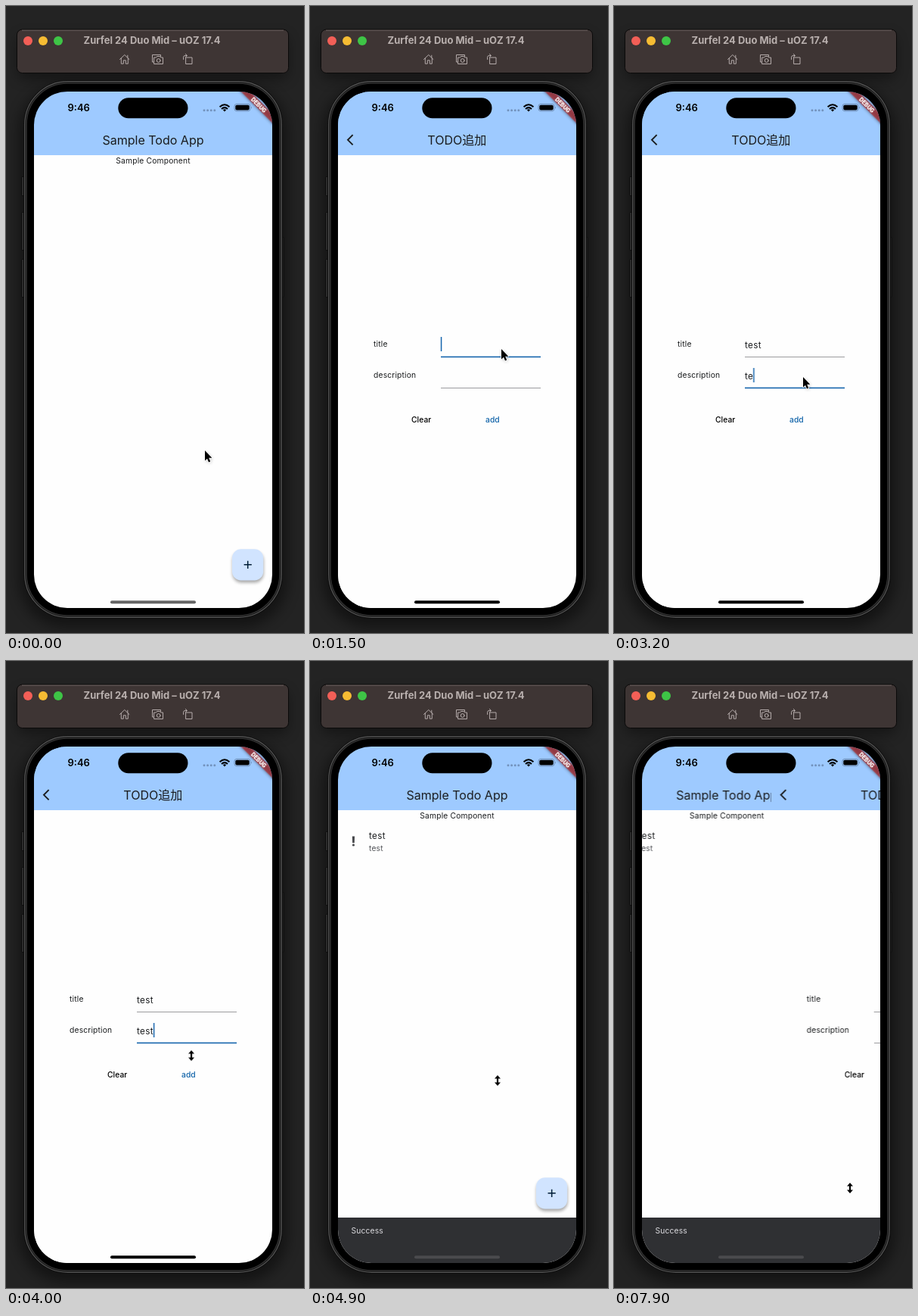
An HTML page for the animation above (8 s loop, 394 by 828 pixels).

```html
<!DOCTYPE html>
<html lang="ja">
<head>
<meta charset="utf-8">
<title>Sample Todo App</title>
<style>
  html, body { margin: 0; width: 100%; height: 100%; overflow: hidden; background: #232323; }
  svg { display: block; width: 394px; height: 828px; }
  text { font-family: Inter, "Noto Sans CJK JP", sans-serif; fill: #1a1c1e; }
  .mid { text-anchor: middle; }
  .head { font-size: 16.1px; letter-spacing: -.05px; }
  .body { font-size: 10.27px; letter-spacing: .18px; }
  .large { font-size: 11.72px; letter-spacing: .37px; }
  .button { font-size: 10.27px; font-weight: 500; letter-spacing: .07px; }
  .tool { fill: none; stroke: #b4abaa; stroke-width: 1; stroke-linejoin: round; stroke-linecap: round; }
  .rule { fill: #9b9b9e; }
  .focus { fill: #1565ad; }
</style>
</head>
<body>
<svg viewBox="0 0 394 828">
  <defs>
    <clipPath id="screen"><rect x="37" y="113" width="315" height="682" rx="44"/></clipPath>
    <filter id="blur" x="-30%" y="-30%" width="160%" height="160%"><feGaussianBlur stdDeviation="9"/></filter>
    <filter id="soft" x="-50%" y="-50%" width="200%" height="200%"><feGaussianBlur stdDeviation="2.2"/></filter>
  </defs>

  <rect width="394" height="828" fill="#232323"/>
  <rect x="17" y="104" width="355" height="716" rx="62" fill="#000" opacity=".45" filter="url(#blur)"/>
  <rect x="16" y="40" width="356" height="56" rx="8" fill="#000" opacity=".4" filter="url(#blur)"/>

  <!-- window bar -->
  <rect x="14.5" y="31" width="359" height="57.5" rx="7" fill="#3e3534" stroke="#0b0a0a"/>
  <path d="M21 32.2H367" stroke="#6a605f"/>
  <circle cx="29" cy="46" r="6" fill="#f35f57"/>
  <circle cx="49" cy="46" r="6" fill="#f6bc33"/>
  <circle cx="69" cy="46" r="6" fill="#3ec546"/>
  <text class="mid" x="193" y="50" style="font-size:13px;font-weight:700;fill:#b9b0ae">Zurfel 24 Duo Mid – uOZ 17.4</text>
  <g class="tool">
    <path d="M150.5 70.5L156.8 64.5L163 70.5M152.3 69V76.2H155.3V71.8H158.3V76.2H161.3V69M160.8 68V65.2"/>
    <path d="M195.5 74H193.5V64.5H204.5V66.5M196 68H198.5L199.5 66.5H203.5L204.5 68H207.5V76.5H196Z"/>
    <circle cx="201.7" cy="72" r="2.4"/>
    <path d="M238 68H246V76.5H238ZM234.6 70.5V67.5Q234.6 65.5 237 65.5H239M237.4 63.4L239.4 65.5L237.4 67.5"/>
  </g>

  <!-- phone body -->
  <g fill="#2b2b2b" stroke="#0d0d0d">
    <rect x="20.5" y="225.5" width="5" height="25" rx="1"/>
    <rect x="20.5" y="272.5" width="5" height="50" rx="1"/>
    <rect x="20.5" y="334.5" width="5" height="50" rx="1"/>
    <rect x="362.5" y="305.5" width="4.5" height="79" rx="1"/>
  </g>
  <rect x="23.5" y="98.5" width="342" height="710" rx="58" fill="#171717" stroke="#0c0c0c"/>
  <rect x="24.7" y="99.7" width="339.6" height="707.6" rx="57" fill="none" stroke="#565656" stroke-width="1.2"/>
  <rect x="27" y="102" width="335" height="703" rx="54.5" fill="#000" stroke="#2e2e2e" stroke-width="1.6"/>

  <g clip-path="url(#screen)">
    <g id="home">
      <rect x="37" y="113" width="315" height="682" fill="#fefefe"/>
      <rect x="37" y="113" width="315" height="84" fill="#9ecaff"/>
      <text class="head mid" x="194.5" y="182.8">Sample Todo App</text>
      <text class="body mid" x="194.5" y="208.3">Sample Component</text>
      <g id="todo">
        <path d="M55.9 231.5H59.1L58.8 240.2H56.2Z" fill="#45464a"/>
        <circle cx="57.5" cy="243" r="1.6" fill="#45464a"/>
        <text class="large" x="78" y="235.2">test</text>
        <text class="body" x="78" y="250.5" style="fill:#505257">test</text>
      </g>
      <g id="fab">
        <rect x="299.5" y="720.5" width="41" height="41" rx="12" opacity=".35" filter="url(#soft)"/>
        <rect x="299" y="717.2" width="41.2" height="41.2" rx="11.7" fill="#d1e4ff"/>
        <path d="M314.6 737.8H324.8M319.7 732.7V742.9" stroke="#001d36" stroke-width="1.5"/>
      </g>
    </g>

    <g id="page">
      <rect x="37" y="113" width="315" height="682" fill="#fefefe"/>
      <rect x="37" y="113" width="315" height="84" fill="#9ecaff"/>
      <path d="M56.6 170.2L50 176.8L56.6 183.4" fill="none" stroke="#1a1c1e" stroke-width="1.9"/>
      <text class="head mid" x="194.3" y="182.8">TODO追加</text>
      <text class="body" x="84" y="450.4">title</text>
      <text class="body" x="84" y="491.4">description</text>
      <g id="fields"></g>
      <text class="button" x="134" y="550" style="fill:#000">Clear</text>
      <text class="button" x="232" y="550" style="fill:#0e62a8">add</text>
    </g>

    <g id="snack">
      <rect x="37" y="735" width="315" height="60" fill="#2f3033"/>
      <text class="body" x="54.5" y="756" style="fill:#dddce0">Success</text>
    </g>

    <rect id="bar" x="138" y="785.2" width="113" height="4" rx="2" fill="#666"/>

    <!-- status bar -->
    <rect x="148.3" y="121.3" width="92.2" height="27" rx="13.5"/>
    <text x="81.5" y="139.3" style="font-size:13px;font-weight:600;fill:#000">9:46</text>
    <path d="M262 137.8H276" stroke="#7393bd" stroke-width="3" stroke-linecap="round" stroke-dasharray="0 4.6"/>
    <g fill="none" stroke="#000" stroke-width="2.1">
      <path d="M282.6 133.2Q289 127.3 295.4 133.2M285 135.9Q289 132.2 293 135.9"/>
    </g>
    <path d="M286.9 137.2Q289 135.5 291.1 137.2L289 139.6Z"/>
    <rect x="302" y="129.4" width="21" height="9.4" rx="3" fill="none" stroke="#6b89b0" stroke-width=".9"/>
    <rect x="303.3" y="130.7" width="18.4" height="6.8" rx="1.9"/>
    <path d="M324.2 132.4Q326 134.1 324.2 135.8Z" fill="#6b89b0"/>

    <g transform="translate(352 113) rotate(45)">
      <rect x="-40" y="20.5" width="80" height="8.8" opacity=".5" filter="url(#soft)"/>
      <rect x="-40" y="20.5" width="80" height="8.8" fill="#b71c1c" opacity=".63"/>
      <text class="mid" y="27.5" style="font-size:7.2px;font-weight:900;fill:#fff">DEBUG</text>
    </g>
  </g>

  <g id="cursor">
    <g id="arrow" stroke-linejoin="round">
      <path d="M1 1.5V15L4 12.3L6 17L8.2 16L6.2 11.4H10Z" opacity=".3" filter="url(#soft)"/>
      <path d="M0 0V13.4L3 10.7L5 15.4L7.2 14.5L5.2 9.8H9.4Z" stroke="#fff" stroke-width="1.6" paint-order="stroke"/>
    </g>
    <path id="resize" d="M0 -7L4 -2.6H1.1V2.6H4L0 7L-4 2.6H-1.1V-2.6H-4Z"
      stroke="#fff" stroke-width="1.4" stroke-linejoin="round" paint-order="stroke"/>
  </g>
</svg>

<script>
const LOOP = 8000;
const SLIDE = 'cubic-bezier(.35,.91,.33,.97)';
const STEP = 'step-end';
const $ = id => document.getElementById(id);

// rows: [time, value, easing towards the next row]
function track(el, prop, rows, ease = 'linear') {
  const keys = rows.map(([t, v, e]) => ({ offset: t / LOOP, [prop]: v, easing: e || ease }));
  keys.push({ offset: 1, [prop]: rows[rows.length - 1][1] });
  el.animate(keys, { duration: LOOP, iterations: Infinity });
}
const move = (el, rows, ease) =>
  track(el, 'transform', rows.map(([t, x, y, e]) => [t, `translate(${x}px, ${y}px)`, e]), ease);
const show = (el, from, to, prop = 'opacity') =>
  track(el, prop, [[0, from ? 0 : 1], ...(from ? [[from, 1]] : []), ...(to < LOOP ? [[to, 0]] : [])], STEP);

function make(tag, attrs, parent) {
  const el = document.createElementNS('http://www.w3.org/2000/svg', tag);
  for (const k in attrs) el.setAttribute(k, attrs[k]);
  return parent.appendChild(el);
}

// underlined input with focus line, typed letters and caret
function field(y, focus, blur, typed) {
  const box = $('fields'), x = 173;
  make('rect', { class: 'rule', x, y, width: 132, height: 1 }, box);
  const line = make('rect', { class: 'focus', x, y: y - .4, width: 132, height: 1.6 }, box);
  const text = make('text', { class: 'large', x, y: y - 11.2 }, box);
  const letters = [...'test'].map(c => {
    const span = make('tspan', {}, text);
    span.textContent = c;
    return span;
  });
  const caret = make('rect', { class: 'focus', x: x - .2, y: y - 26, width: 1.5, height: 19 }, box);
  letters.forEach((span, i) => show(span, typed[i], 5000, 'fillOpacity'));
  show(line, focus, blur);
  show(caret, focus, blur);
  move(caret, [[0, 0, 0], ...typed.map((t, i) => [t, text.getSubStringLength(0, i + 1), 0])], STEP);
}
field(463, 1300, 2950, [1900, 2050, 2200, 2350]);
field(504, 2950, 5000, [3100, 3200, 3300, 3400]);

move($('home'), [[0, 0, 0], [425, 0, 0, SLIDE], [825, -99, 0], [4510, -99, 0, SLIDE], [4910, 0, 0],
  [7830, 0, 0], [7900, -45, 0], [7999, -86, 0]]);
move($('page'), [[0, 315, 0], [425, 315, 0, SLIDE], [825, 0, 0], [4510, 0, 0, SLIDE], [4910, 315, 0],
  [7830, 315, 0], [7900, 172, 0], [7999, 42, 0]]);

show($('todo'), 4500, LOOP);
move($('snack'), [[0, 0, 60], [4560, 0, 60, 'cubic-bezier(.4,0,.2,1)'], [4810, 0, 0]]);
move($('fab'), [[0, 0, 0], [4640, 0, 0, 'cubic-bezier(.1,.6,.3,1)'], [4810, 0, -35]]);
track($('bar'), 'fill', [[0, '#666'], [1200, '#666'], [1500, '#000'], [4600, '#000'], [4850, '#4a4a4d']]);

move($('cursor'), [[0, 263, 587, 'ease-in-out'], [330, 318, 746], [480, 318, 746, 'ease-in-out'],
  [800, 281, 532, 'ease-out'], [1200, 253, 453], [2750, 253, 453, 'ease-in-out'], [2930, 250, 490],
  [3650, 250, 490], [4000, 245, 521], [4300, 248, 554], [7150, 248, 554, 'ease-in-out'],
  [7400, 318, 691], [7550, 318, 691, 'ease-out'], [7750, 312, 696]]);
show($('arrow'), 0, 3700);
show($('resize'), 3700, LOOP);
</script>
</body>
</html>
```
